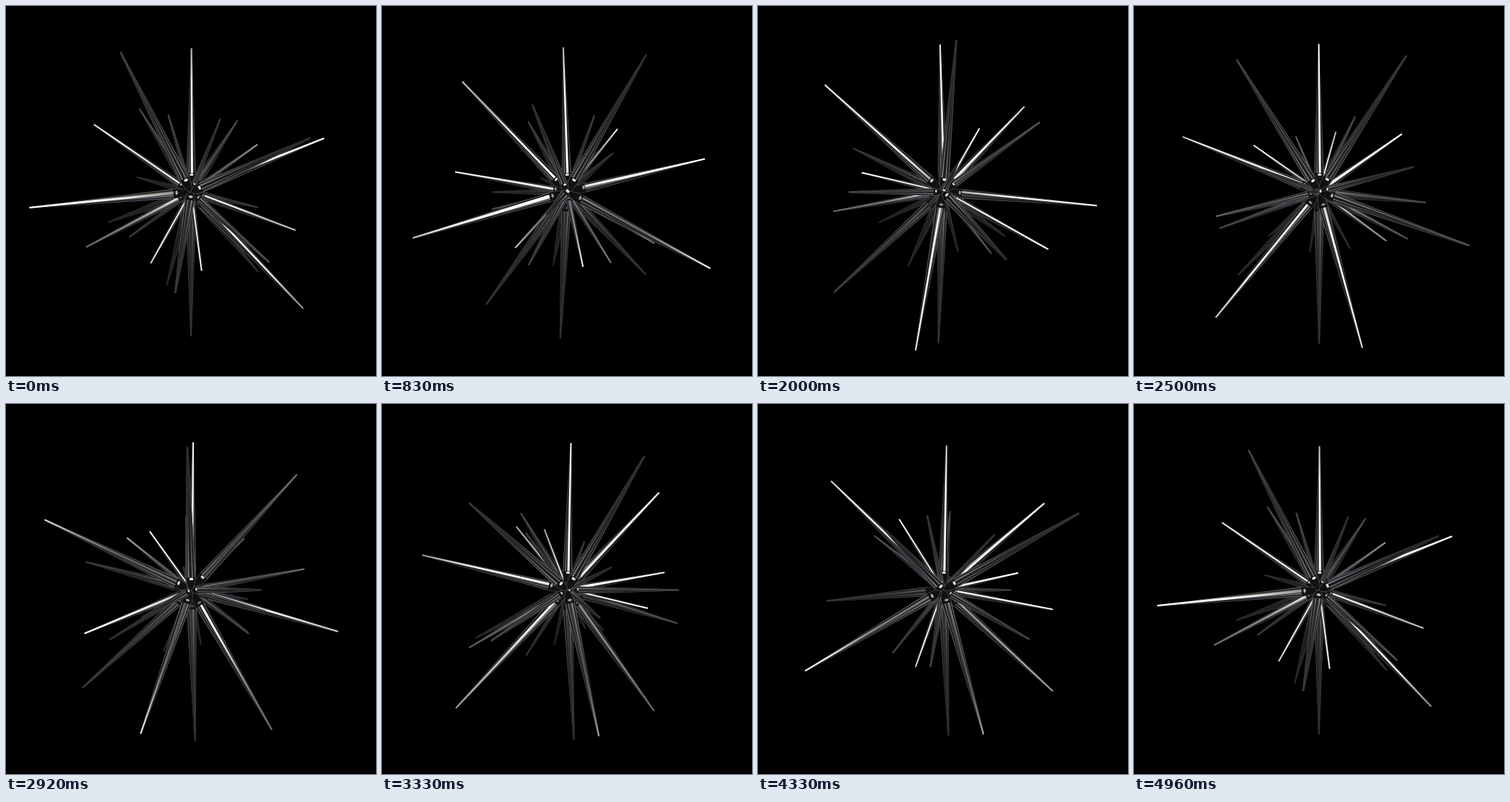
Animation of 512x512 px, one loop 5 s. Source, as an HTML page with a canvas:

```html
<!DOCTYPE html>
<html lang="en">
<head>
<meta charset="utf-8">
<title>Turning spike star</title>
<style>
html, body { margin: 0; width: 100%; height: 100%; overflow: hidden; background: #000; }
canvas { display: block; width: 100%; height: 100%; }
</style>
</head>
<body>
<canvas id="stage" width="512" height="512"></canvas>
<script>
const ctx = document.getElementById('stage').getContext('2d');
const LOOP = 5000, STEPS = 119;
const CX = 256, CY = 257.5, CAMERA = 436;
const NECK = 0.13, RAD = Math.PI / 180;
const LONG = 200, MEDIUM = 155, SHORT = 112;

// Key directions of the long spikes: azimuth (0 faces the viewer) and elevation
const KEYS = [
  [32, 13.5], [91, 22], [230, -15.6], [295, -5], [356, -24],
  [60, -42], [129.5, -42.5], [201, -54],
  [147, 40], [220, 46], [332, 43]
];
// Side light and overhead light (y points down)
const LIGHTS = [[0.46, -0.2, 0.87], [0.15, -0.8, 0.58]];

const dot = (a, b) => a[0] * b[0] + a[1] * b[1] + a[2] * b[2];
const scale = (a, k) => a.map(v => v * k);
const unit = a => scale(a, 1 / Math.hypot(...a));
const clamp = v => Math.max(0, Math.min(1, v));
const grey = (v, alpha = 1) => `rgba(${v},${v},${v},${alpha})`;
const bell = (v, width) => Math.exp(-((v / width) ** 2));
const spike = (azimuth, elevation, size) => ({ azimuth, elevation, size });
const repeat = (n, make) => Array.from({ length: n }, (_, i) => make(i));

const SPIKES = [
  spike(175, 88.2, 202),
  spike(180, -87, 205),
  ...KEYS.map(([a, e]) => spike(a, e, LONG)),
  // a mirrored pair, a chain sinking around the waist, a spiral from bottom to top
  ...repeat(2, i => spike(284, 34 - 61 * i, MEDIUM)),
  ...repeat(5, i => spike(220 - 45 * i, 10 - 10 * i, MEDIUM - 5)),
  ...repeat(8, i => spike(12 - 57 * i, 57 * Math.sin((i - 3.5) / 7 * Math.PI), SHORT))
];

function project(p) {
  const s = CAMERA / (CAMERA - p[2]);
  return { x: CX + p[0] * s, y: CY + p[1] * s, s };
}

function halfway(p, light) {
  const view = unit([-p[0], -p[1], CAMERA - p[2]]);
  return unit(view.map((v, i) => v + light[i]));
}

function pose({ azimuth, elevation, size }, turn) {
  const a = azimuth * RAD + turn, e = elevation * RAD;
  const dir = [Math.cos(e) * Math.sin(a), -Math.sin(e), Math.cos(e) * Math.cos(a)];
  return { dir, size, tip: scale(dir, size) };
}

function drawSpike({ tip, dir, size }) {
  const base = project(scale(tip, NECK));
  const end = project(tip);
  const length = Math.hypot(end.x - base.x, end.y - base.y) || 1;
  const ex = (end.x - base.x) / length, ey = (end.y - base.y) / length;
  const nx = -ey, ny = ex;
  const wide = size * 0.033 * base.s, thin = Math.sqrt(end.s);
  const front = clamp(0.7 + dir[2] * 0.35);

  const along = stops => {
    const g = ctx.createLinearGradient(base.x, base.y, end.x, end.y);
    stops.forEach((c, i) => g.addColorStop(i / (stops.length - 1), c));
    return g;
  };
  // A strip from neck to tip; each end has its own pair of side offsets
  const strip = (b0, b1, t0, t1, fill) => {
    ctx.beginPath();
    ctx.moveTo(base.x + nx * b0, base.y + ny * b0);
    ctx.lineTo(end.x + nx * t0, end.y + ny * t0);
    ctx.lineTo(end.x + nx * t1, end.y + ny * t1);
    ctx.lineTo(base.x + nx * b1, base.y + ny * b1);
    ctx.fillStyle = fill;
    ctx.fill();
  };
  const band = (s0, s1, fill) => strip(wide * s0, wide * s1, thin * s0, thin * s1, fill);

  // Rounded neck closing toward the hub
  ctx.beginPath();
  ctx.moveTo(base.x + nx * wide, base.y + ny * wide);
  ctx.quadraticCurveTo(CX + nx * wide * 0.7, CY + ny * wide * 0.7, CX, CY);
  ctx.quadraticCurveTo(CX - nx * wide * 0.7, CY - ny * wide * 0.7,
    base.x - nx * wide, base.y - ny * wide);
  ctx.fillStyle = '#111';
  ctx.fill();
  ctx.strokeStyle = grey(120, 0.6 * front);
  ctx.lineWidth = 0.8;
  ctx.stroke();

  band(-1, 1, '#161617');
  band(-1, -0.78, along([`rgba(90,90,110,${front})`, `rgba(70,70,100,${front})`]));
  band(0.78, 1, along([`rgba(98,96,88,${front})`, `rgba(80,78,76,${front})`]));
  band(-0.56, -0.28, along([grey(165, 0.8 * front), grey(90, 0.6 * front), grey(80, 0.6)]));
  band(0.22, 0.5, along([grey(140, 0.7 * front), grey(56, 0.7 * front), grey(95, 0.6)]));

  LIGHTS.forEach((light, index) => {
    const reach = index === 0 ? 1 - 0.9 * Math.max(0, dir[1]) : 1;
    const stops = repeat(7, i => {
      const t = NECK + (1 - NECK) * i / 6;
      const miss = dot(dir, halfway(scale(tip, t), light));
      return grey(255, clamp(reach * (1.2 * bell(miss, 0.13) + 0.25 * bell(miss, 0.5))));
    });
    const half = halfway(scale(tip, 0.5), light);
    const side = (half[0] * nx + half[1] * ny) * 0.8;
    const b = wide * side, t = thin * side * 0.5;
    const w = Math.max(0.8, wide * 0.22);
    strip(b - w, b + w, t - 0.9, t + 0.9, along(stops));
  });

  // Small gleam on the shoulder
  if (dir[2] > -0.25) {
    const gx = base.x - ex * wide * 0.5 + 0.8, gy = base.y - ey * wide * 0.5 - 1.2;
    ctx.beginPath();
    ctx.ellipse(gx, gy, wide * 0.42, wide * 0.25, Math.atan2(ny, nx), 0, 7);
    ctx.fillStyle = grey(245, clamp(0.55 + 0.4 * dir[2] - 0.35 * dir[1]));
    ctx.fill();
  }
}

function render(step) {
  const turn = step / STEPS * Math.PI * 2;
  ctx.fillStyle = '#000';
  ctx.fillRect(0, 0, 512, 512);
  SPIKES.map(s => pose(s, turn))
    .sort((a, b) => a.tip[2] - b.tip[2])
    .forEach(drawSpike);
}

// 24 pictures a second, with start times rounded to 10 ms
function stepAt(ms) {
  return Math.min(STEPS, Math.ceil((Math.floor(ms / 10) + 0.5) * 0.24) - 1);
}

function tick() {
  render(stepAt(performance.now() % LOOP));
  requestAnimationFrame(tick);
}
tick();
</script>
</body>
</html>
```
